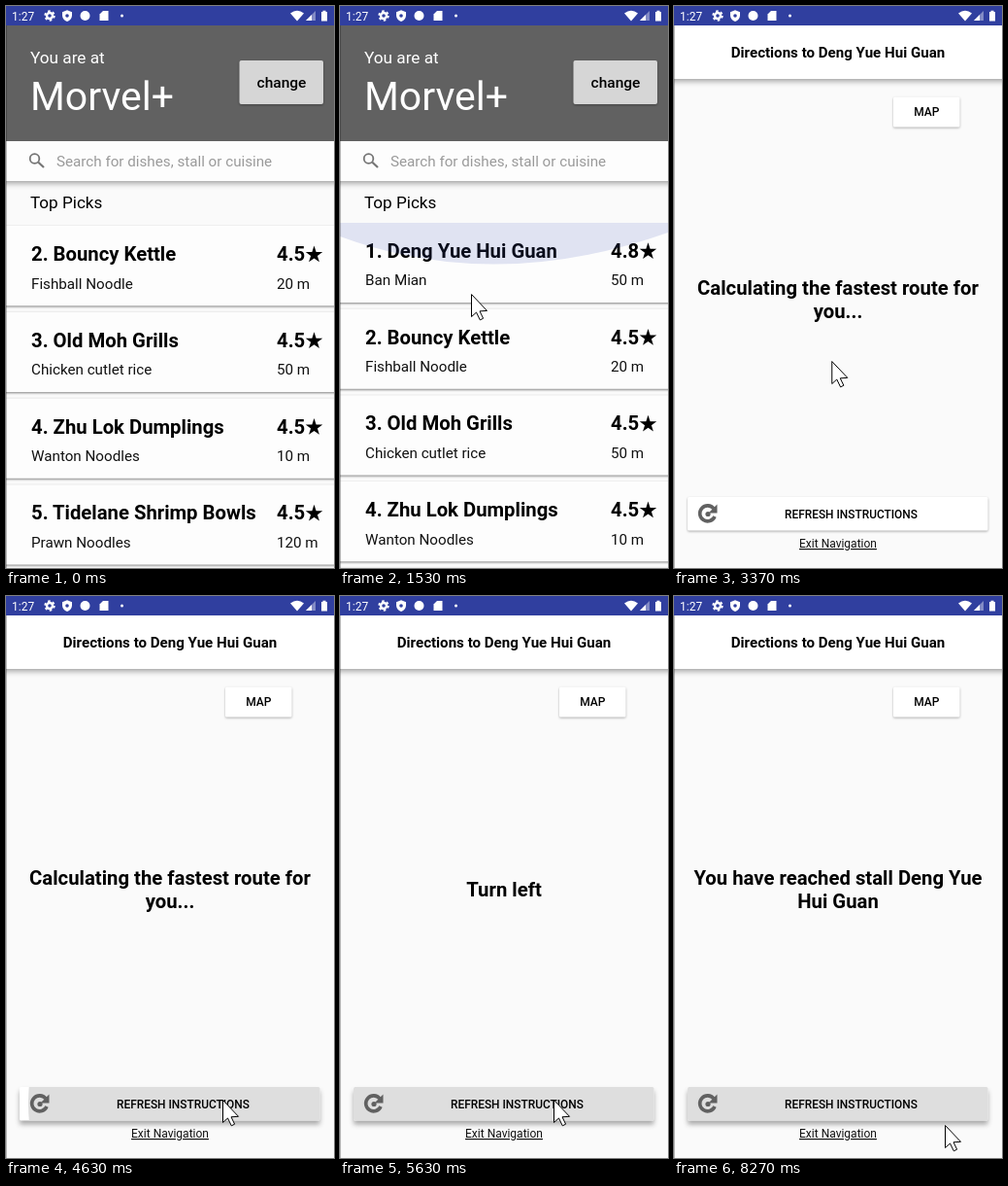
Animation of 338 by 578 pixels, one loop 8.34 s. Source, as an HTML page:

```html
<!DOCTYPE html>
<html lang="en">
<head>
<meta charset="utf-8">
<title>Food stall finder</title>
<style>
  html, body { margin: 0; width: 100%; height: 100%; overflow: hidden; background: #fafafa; }
  svg { display: block; width: 100vw; height: 100vh; font-family: Roboto, sans-serif; }
  .card { filter: drop-shadow(0 1px 1.2px rgba(0,0,0,.5)); }
  .bar { filter: drop-shadow(0 2px 3px rgba(0,0,0,.4)); }
  .raised { filter: drop-shadow(0 1px 1px rgba(0,0,0,.3)); }
  #click { mix-blend-mode: multiply; }
</style>
</head>
<body>
<svg id="stage" viewBox="0 0 338 578"></svg>
<script>
const LOOP = 8340;
const STALL = 'Deng Yue Hui Guan';
const stalls = [
  [STALL, 'Ban Mian', '4.8', '50 m'],
  ['Bouncy Kettle', 'Fishball Noodle', '4.5', '20 m'],
  ['Old Moh Grills', 'Chicken cutlet rice', '4.5', '50 m'],
  ['Zhu Lok Dumplings', 'Wanton Noodles', '4.5', '10 m'],
  ['Tidelane Shrimp Bowls', 'Prawn Noodles', '4.5', '120 m'],
];

const text = (x, y, size, str, attrs = '') =>
  `<text x="${x}" y="${y}" font-size="${size}" ${attrs}>${str}</text>`;
const rect = (x, y, w, h, fill, attrs = '') =>
  `<rect x="${x}" y="${y}" width="${w}" height="${h}" fill="${fill}" ${attrs}/>`;
const bold = 'font-weight="700"';
const medium = 'font-weight="500"';
const centred = 'text-anchor="middle"';

const starPoints = Array.from({ length: 10 }, (_, i) => {
  const r = i % 2 ? 3.6 : 9.2, a = i * Math.PI / 5;
  return `${(r * Math.sin(a)).toFixed(2)},${(-r * Math.cos(a)).toFixed(2)}`;
}).join(' ');

const statusBar = `
  ${rect(0, 0, 338, 20, '#303f9f')}
  ${text(6, 14.5, 12, '1:27', 'fill="#fff"')}
  <g fill="none" stroke="#fff">
    <circle cx="45" cy="10" r="3" stroke-width="2.4"/>
    <circle cx="45" cy="10" r="4.8" stroke-width="1.8" stroke-dasharray="2.5 2.53"/>
  </g>
  <g fill="#fff">
    <path d="M63 4.3l5 2v3.5c0 3-2 5-5 6.2c-3-1.2-5-3.2-5-6.2V6.3z"/>
    <circle cx="63" cy="10" r="1.8" fill="#303f9f"/>
    <circle cx="81.5" cy="10" r="5"/>
    <path d="M100 5h5.5v10h-9V8.5z"/>
    <circle cx="119.5" cy="10" r="1.5"/>
    <path d="M293 7.5q7-5.5 14 0L300 15.5z"/>
    <path d="M319 5v10h-10z" opacity=".4"/>
    <path d="M315 9v6h-6z"/>
    <path d="M325 6h1.500V4.800h3V6h1.500v9.500h-6z"/>
  </g>`;

const card = ([name, dish, score, dist], i) => `
  <g transform="translate(0 ${222.75 + i * 88.75})">
    ${rect(-4, 0, 346, 82.3, '#fdfdfd', 'class="card"')}
    ${text(26, 36, 20.3, `${i + 1}. ${name}`, bold)}
    ${text(279, 36, 20.3, score, bold)}
    <polygon points="${starPoints}" transform="translate(317.5 29.8)"/>
    ${text(26, 64.5, 15.2, dish, 'fill="#111"')}
    ${text(279, 64.5, 15.2, dist, 'fill="#111"')}
  </g>`;

const home = `
  <g id="home">
    ${rect(0, 0, 338, 620, '#fafafa')}
    <g clip-path="url(#listClip)">
      <g id="list">${stalls.map(card).join('')}</g>
      <path id="glow" fill="#3f51b5"/>
    </g>
    ${rect(0, 180, 338, 43, '#fafafa')}
    ${text(25, 208, 17.1, 'Top Picks')}
    ${rect(-6, 139, 350, 41, '#fdfdfd', 'class="bar"')}
    <path d="M33.3 160.8l5.7 5.2" stroke="#757575" stroke-width="2.2"/>
    <circle cx="29.5" cy="157" r="4.8" fill="none" stroke="#757575" stroke-width="1.8"/>
    ${text(52, 165, 15.2, 'Search for dishes, stall or cuisine', 'fill="#9a9a9a"')}
    ${rect(0, 19, 338, 120, '#616161')}
    ${text(25, 58.5, 17.2, 'You are at', 'fill="#fff"')}
    ${text(25, 107, 41, 'Morvel+', 'fill="#fff"')}
    ${rect(240.5, 56, 86.5, 45, '#d6d6d6', 'rx="2" class="raised"')}
    ${text(284, 84, 15.5, 'change', `${medium} ${centred}`)}
  </g>
  ${statusBar}
  ${rect(0, 0, 338, 578, '#000', 'id="dim"')}`;

const message = (...lines) => `<g class="message" ${bold} ${centred}>` +
  lines.map((s, i) => text(169, (lines.length > 1 ? 297 : 308.5) + 24 * i, 20.3, s)).join('') + '</g>';

const route = `
  <g id="route" clip-path="url(#reveal)"><g id="page">
    ${rect(0, 0, 338, 620, '#fafafa')}
    ${rect(-6, 20, 350, 55, '#fff', 'class="bar"')}
    ${text(169, 53, 15.1, 'Directions to ' + STALL, `${bold} ${centred}`)}
    ${rect(226, 93.5, 68.5, 31, '#fff', 'rx="1.5" class="raised"')}
    ${text(260.3, 113.3, 12, 'MAP', `${medium} ${centred}`)}
    ${message('Calculating the fastest route for', 'you...')}
    ${message('Turn left')}
    ${message('You have reached stall Deng Yue', 'Hui Guan')}
    <g id="button">${rect(14, 505, 309.5, 34.5, '#fff', 'rx="1.5"')}</g>
    <g clip-path="url(#buttonClip)"><circle id="ripple" cx="223" cy="522" fill="#dedede"/></g>
    <path d="M41 517a8 8 0 1 0 1 8" fill="none" stroke="#616161" stroke-width="3.6"/>
    <path d="M44.5 512.5v9h-9z" fill="#616161"/>
    <circle cx="35" cy="522.5" r="2.6" fill="#616161"/>
    ${text(182.5, 527, 11.9, 'REFRESH INSTRUCTIONS', `${medium} ${centred}`)}
    ${text(169, 557, 12, 'Exit Navigation', `${centred} fill="#111" text-decoration="underline"`)}
    ${statusBar}
  </g></g>`;

const stage = document.getElementById('stage');
stage.innerHTML = `
  <defs>
    <clipPath id="listClip">${rect(0, 223, 338, 400, '#000')}</clipPath>
    <clipPath id="buttonClip">${rect(14, 505, 309.5, 34.5, '#000', 'rx="1.5"')}</clipPath>
    <clipPath id="reveal">${rect(0, 0, 338, 620, '#000', 'id="revealBox"')}</clipPath>
  </defs>
  ${home}${route}
  ${rect(0, 20, 1, 558, '#000', 'opacity=".25"')}
  <circle id="click" r="18" fill="#ffff70"/>
  <path id="pointer" d="M.5 .5V23.5L5.5 19L9.3 26.8L12.6 25.2L9 17.8L16.5 17.3Z" fill="#fff" stroke="#000"/>`;

const el = {};
stage.querySelectorAll('[id]').forEach(e => el[e.id] = e);
const messages = stage.querySelectorAll('.message');

const phase = (t, from, to) => Math.min(1, Math.max(0, (t - from) / (to - from)));
const easeOut = p => 1 - (1 - p) ** 2;

// Pointer moves: start, end, destination x and y.
const moves = [
  [300, 530, 140, 303],
  [610, 1300, 135, 400],
  [1380, 1690, 135, 259],
  [1910, 2070, 117, 250],
  [2370, 2450, 119, 256],
  [3220, 3860, 223, 518],
  [5400, 5480, 220, 518],
  [8030, 8270, 279, 544],
];
const clicks = [[680, 1370], [2450, 3220], [4240, 4390], [5250, 5400], [7190, 7270]];
const presses = [[4581, 5100], [5430, 5900], [7371, LOOP]];

function pointerAt(t) {
  let x = 182, y = 461;
  for (const [from, to, toX, toY] of moves) {
    const p = easeOut(phase(t, from, to));
    x += (toX - x) * p;
    y += (toY - y) * p;
  }
  return [x, y];
}

const show = (e, on) => e.setAttribute('display', on ? 'inline' : 'none');
const move = (e, x, y) => e.setAttribute('transform', `translate(${x} ${y})`);

function drawHome(t) {
  move(el.list, 0, -85.5 * (1 - easeOut(phase(t, 610, 1220))));
  const size = phase(t, 1150, 1450);
  el.glow.setAttribute('d', `M0 223v${14 * size}Q160 ${223 + 73 * size} 338 ${223 + 10 * size}V223Z`);
  el.glow.setAttribute('opacity', .17 * (1 - phase(t, 1500, 1760)));
}

function drawTransition(t) {
  const p = phase(t, 2815, 3220);
  move(el.home, 0, -18 * p * p);
  el.dim.setAttribute('opacity', .3 * p);
  show(el.route, p > 0);
  el.revealBox.setAttribute('y', 578 * (1 - easeOut(p)));
  move(el.page, 0, 24 * (1 - p * p));
}

function drawRoute(t) {
  const step = (t >= 5560) + (t >= 6020);
  messages.forEach((m, i) => show(m, i === step));

  const [start, end] = presses.filter(p => t >= p[0]).pop() || [t, t];
  const press = t > start ? 1 - phase(t, end, end + 220) : 0;
  el.ripple.setAttribute('r', Math.min(230, 4 * (t - start)));
  el.ripple.setAttribute('opacity', press);
  el.button.style.filter = `drop-shadow(0 ${1 + 3 * press}px ${1 + 1.5 * press}px rgba(0,0,0,.32))`;
}

function drawPointer(t) {
  const [x, y] = pointerAt(t);
  move(el.pointer, x, y);
  move(el.click, x, y);
  show(el.pointer, t >= 300);
  show(el.click, clicks.some(([from, to]) => t >= from && t < to));
}

function tick() {
  const t = performance.now() % LOOP;
  drawHome(t);
  drawTransition(t);
  drawRoute(t);
  drawPointer(t);
  requestAnimationFrame(tick);
}
tick();
</script>
</body>
</html>
```
